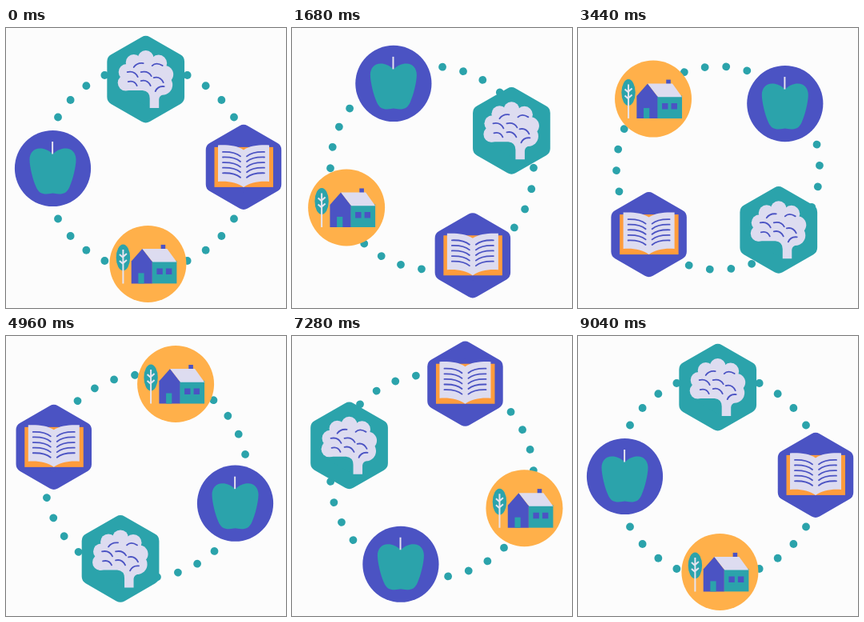
Recreate the animation shown at these times as an HTML page. Size 350 by 350 pixels, loop 9080 ms.

```html
<!DOCTYPE html>
<html lang="en">
<head>
<meta charset="utf-8">
<title>Orbiting icons</title>
<style>
  html, body { margin: 0; width: 100%; height: 100%; overflow: hidden; background: #fcfcfc; }
  svg { display: block; width: 100vw; height: 100vh; }
  .teal { fill: #2ba3ab; }
  .blue { fill: #4b53c3; }
  .orange { fill: #ffb04a; }
  .cover { fill: #ff9c3c; }
  .pale { fill: #dddcf0; }
  .line { fill: none; stroke: #4b53c3; stroke-width: 1.8; stroke-linecap: round; }
  .twig { fill: none; stroke: #e6e4f0; stroke-width: 2; }
  .hex { stroke-width: 20; stroke-linejoin: round; }
  .hex.teal { stroke: #2ba3ab; }
  .hex.blue { stroke: #4b53c3; }
</style>
</head>
<body>
<svg viewBox="0 0 350 350">
  <g id="dots" class="teal"></g>

  <g id="brain">
    <polygon class="hex teal"/>
    <g class="pale">
      <g id="lobes"></g>
      <path d="M-27 14 H-4 Q5 15 5 24 V36 H16.5 V25 Q17 20 23 19 L27 -8 L16 -22 L0 -28 L-16 -22 L-28 -10 Z"/>
    </g>
    <path class="line" d="M-15 -15 Q-11 -21 -3 -20 M8 -17 Q13 -22 21 -17 M-23 -9 Q-14 -11 -10 -3
      M-6 -9 Q3 -11 7 -4 M-22 3 Q-14 1 -11 8 M-6 2 Q2 0 6 8 M10 -2 Q18 -4 22 4 M12 15 Q15 8 23 9"/>
  </g>

  <g id="book">
    <polygon class="hex blue"/>
    <rect class="cover" x="-36.5" y="-25" width="73.5" height="50"/>
    <path class="pale" d="M0 -21.5 C8 -27 20 -28 32 -27.5 V18 C20 17 8 19 0 25 C-8 19 -20 17 -32 18 V-27.5 C-20 -28 -8 -27 0 -21.5 Z"/>
    <g id="rows" class="line"></g>
  </g>

  <g id="house">
    <circle class="orange" r="48"/>
    <ellipse class="teal" cx="-31" cy="-8" rx="8.7" ry="16.5"/>
    <path class="twig" d="M-31 -18 V24.5 M-31 -8 L-35.5 -12 M-31 -9 L-26.5 -13 M-31 0 L-35.5 -4 M-31 -1 L-26.5 -5"/>
    <rect class="blue" x="16.2" y="-24" width="5.6" height="6"/>
    <rect class="teal" x="5" y="-4" width="31" height="28.5"/>
    <path class="blue" d="M-7 -19 L-20.7 -3.5 V24.5 H5.3 V-3 Z"/>
    <path class="pale" d="M-7 -19 H24 L36 -2.3 H6 Z"/>
    <rect class="teal" x="-12" y="11.5" width="7.2" height="13"/>
    <path class="blue" d="M11 5.5 h7.4 v7.5 h-7.4 Z M22.5 5.5 h7.4 v7.5 h-7.4 Z"/>
  </g>

  <g id="apple">
    <circle class="blue" r="47.6"/>
    <path class="teal" d="M0 -18 C6 -23 10 -25 16 -25 C24 -25 29 -19 29 -11 C29 -2 25 14 21 23 C18 30 14 32 8 32 C4 32 2 31 0 31
      C-2 31 -4 32 -8 32 C-14 32 -18 30 -21 23 C-25 14 -29 -2 -29 -11 C-29 -19 -24 -25 -16 -25 C-10 -25 -6 -23 0 -18 Z"/>
    <path class="twig" d="M-0.4 -33.5 V-18"/>
  </g>
</svg>
<script>
  const LOOP = 9080, STEP = 40;
  const $ = id => document.getElementById(id);

  function add(parent, tag, attrs) {
    const el = document.createElementNS('http://www.w3.org/2000/svg', tag);
    for (const name in attrs) el.setAttribute(name, attrs[name]);
    parent.appendChild(el);
  }

  // Point on a circle; degrees run clockwise from the top
  function polar(cx, cy, r, deg) {
    const a = deg * Math.PI / 180;
    return [cx + r * Math.sin(a), cy - r * Math.cos(a)];
  }

  function hexagon(id, r) {
    const points = [0, 60, 120, 180, 240, 300].map(deg => polar(0, 0, r, deg));
    $(id).querySelector('.hex').setAttribute('points', points.join(' '));
  }

  hexagon('brain', 44.3);
  hexagon('book', 43);

  for (const [cx, cy, r] of [
    [0, -26, 10], [-15, -21, 10], [-24, -9, 10], [-25, 4.5, 10],
    [16, -20, 10.5], [23.5, -6, 11], [21, 7, 12.5]
  ]) add($('lobes'), 'circle', { cx, cy, r });

  for (let y = -19; y < 10; y += 6.6) {
    for (const s of [-1, 1]) {
      add($('rows'), 'path', { d: `M${26 * s} ${y} Q${11 * s} ${y - 0.5} ${4 * s} ${y + 5.5}` });
    }
  }

  for (let quarter = 0; quarter < 360; quarter += 90) {
    for (let i = 0; i < 4; i++) {
      const [cx, cy] = polar(175, 175, 127, quarter + (quarter % 180 ? 30 : 24) + i * 12);
      add($('dots'), 'circle', { cx, cy, r: 4.9 });
    }
  }

  const icons = [
    { el: $('brain'), cx: 174.7, cy: 173.6, r: 109.5, start: 0 },
    { el: $('book'), cx: 175.8, cy: 173.9, r: 121.2, start: 90 },
    { el: $('house'), cx: 177.4, cy: 174.9, r: 120, start: 180 },
    { el: $('apple'), cx: 175, cy: 175.5, r: 116.5, start: 270 }
  ];

  function draw(ms) {
    const t = Math.max(0, Math.floor(ms % LOOP / STEP) * STEP - STEP);
    // The dots finish their turn one step before the icons
    const spin = Math.min(1, t / 8960) * 360;
    $('dots').setAttribute('transform', `rotate(${spin} 175 175)`);
    for (const { el, cx, cy, r, start } of icons) {
      const [x, y] = polar(cx, cy, r, start + t / 9000 * 360);
      el.setAttribute('transform', `translate(${x} ${y})`);
    }
  }

  const begin = performance.now();
  function tick() {
    draw(performance.now() - begin);
    requestAnimationFrame(tick);
  }
  tick();
</script>
</body>
</html>
```
